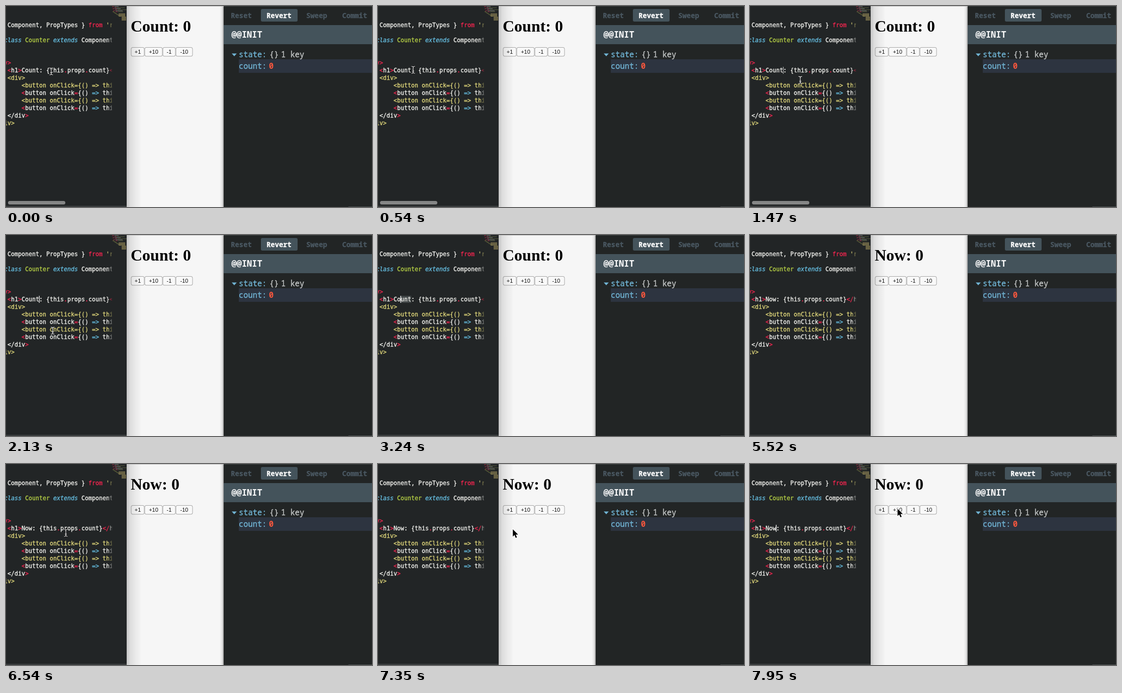
An HTML page with a canvas for the animation above (8 s loop, 728x400 px).

```html
<!DOCTYPE html>
<html>
<head>
<meta charset="utf-8">
<style>
  html, body { margin: 0; width: 728px; height: 400px; overflow: hidden; background: #222526; }
  canvas { display: block; }
</style>
</head>
<body>
<canvas id="stage" width="728" height="400"></canvas>
<script>
const ctx = document.getElementById('stage').getContext('2d');
const LOOP = 8000, CHAR = 7, LEFT = 3, BG = '#222526';
const MONO = '"DejaVu Sans Mono", monospace';
const PANEL = '"Noto Sans Mono", monospace';
const INK = { w: '#f0f0ec', r: '#f0264f', y: '#ded57a', b: '#66bfe2', g: '#b5cf45' };

const CLICK = 1080, RELOAD = 5250;
const SELECT = [2790, 2960, 3130, 3340, 3510];
const TYPE = [3750, 4020, 4140];
const KEYS = [CLICK, ...SELECT, ...TYPE];

// Mouse paths as [time, x, y]
const FIRST_PATH = [[0, 90, 130], [300, 74, 128], [540, 70, 127], [1200, 70, 127],
  [1470, 100, 147], [1800, 101, 175], [2250, 90, 196], [2790, 90, 196]];
const SECOND_PATH = [[6120, 123, 141], [6300, 122, 138], [6540, 119, 137], [6690, 119, 137], [6960, 165, 143],
  [7230, 244, 141], [7470, 292, 119], [7650, 305, 107], [7830, 297, 93], [7950, 293.5, 89], [8001, 293.5, 89]];

const countPast = (times, t) => times.filter(k => k <= t).length;
const clamp = v => Math.max(0, Math.min(1, v));

function rect(x, y, w, h, color, radius = 0) {
  ctx.fillStyle = color;
  ctx.beginPath();
  ctx.roundRect(x, y, w, h, radius);
  ctx.fill();
}

// A thin outline of the same colour gives the heavier look of screen text.
function text(str, x, y, font, color, align = 'left', weight = 0) {
  ctx.font = font;
  ctx.fillStyle = ctx.strokeStyle = color;
  ctx.textAlign = align;
  ctx.fillText(str, x, y);
  if (weight) {
    ctx.lineWidth = weight;
    ctx.strokeText(str, x, y);
  }
}

function fade(x0, x1, stops, y = 0, h = 400) {
  const g = ctx.createLinearGradient(x0, 0, x1, 0);
  stops.forEach(([at, color]) => g.addColorStop(at, color));
  rect(x0, y, x1 - x0, h, g);
}

// Each part is an ink letter followed by its text; a capital letter means italic.
function code(column, y, ...parts) {
  for (const part of parts) {
    const ink = part[0], str = part.slice(1);
    const style = ink < 'a' ? 'italic ' : '';
    text(str, LEFT + column * CHAR, y, style + '11.63px ' + MONO, INK[ink.toLowerCase()], 'left', 0.35);
    column += str.length;
  }
}

function caretAlpha(t) {
  const age = t - Math.max(...KEYS.filter(k => k <= t));
  if (age < 270) return 1;
  const p = (age - 270) % 900;
  return p < 570 ? 1 - clamp(p / 210) ** 2 : clamp((p - 570) / 210);
}

function drawMinimap() {
  for (let i = 0; i < 6; i++) {
    const x = 211 + (i * 5) % 9, y = 1 + i * 2;
    rect(x, y, 4, 1, '#a02c45');
    rect(x + 5, y, 8 + (i * 7) % 11, 1, i % 2 ? '#565b3d' : '#777a77');
  }
  for (let i = 0; i < 7; i++) rect(212 + i * 2.2, 11 + i * 1.5, 3, 1, '#70713f');
  for (let i = 0; i < 7; i++) rect(224 + (i > 2) * 6, 15 + i * 2, i > 2 ? 9 : 13, 1.5, i % 2 ? '#6f6847' : '#8c8052');
}

function drawEditor(t) {
  rect(0, 0, 240, 400, BG);
  const selected = countPast(SELECT, t), typed = countPast(TYPE, t);
  const word = typed ? 'Now'.slice(0, typed) : 'Count';
  const caretX = LEFT + CHAR * (4 + (typed || 5 - selected));
  if (selected && !typed) rect(caretX, 121, selected * CHAR, 14, '#414647');

  ctx.save();
  ctx.beginPath();
  ctx.rect(0, 0, 211, 400);
  ctx.clip();
  code(0, 42, 'wComponent, PropTypes } ', 'rfrom ', "y'react'");
  code(-1, 72, 'Bclass ', 'gCounter ', 'Bextends ', 'wComponent');
  code(-1, 117, 'rv>');
  code(0, 132, 'r<', 'wh1', 'r>', 'w' + word + ': {this', 'r.', 'wprops', 'r.', 'wcount}', 'r</', 'wh1', 'r>');
  code(0, 147, 'y<div>');
  for (const y of [162, 192]) {
    code(4, y, 'y<button onClick={() => this');
    code(4, y + 15, 'r<', 'wbutton onClick', 'r=', 'w{() ', 'B=>', 'w this');
  }
  code(0, 222, 'w</div', 'r>');
  code(-1, 237, 'yiv>');
  ctx.restore();
  fade(201, 212, [[0, '#22252600'], [1, '#222526d0']], 30, 340);

  if (t >= CLICK) {
    ctx.globalAlpha = caretAlpha(t);
    rect(caretX - 0.5, 121, 1.3, 14, '#fff');
  }
  ctx.globalAlpha = 1 - clamp((t - 1750) / 300);
  rect(4, 388, 114, 7, '#858686', 3.5);
  ctx.globalAlpha = 1;
  drawMinimap();
  rect(0, 398, 240, 1, '#535656');
}

function drawPage(t) {
  rect(240, 0, 193, 400, '#f6f6f6');
  text(t < RELOAD ? 'Count: 0' : 'Now: 0', 248, 51, 'bold 32px "Liberation Serif", serif', '#000');
  [['+1', 249, 27], ['+10', 276, 36], ['-1', 312, 26], ['-10', 338, 34]].forEach(([label, x, w]) => {
    rect(x - 0.5, 82, w, 18.5, '#a6a6a6', 4);
    rect(x + 0.5, 83, w - 2, 16.5, '#f9f9f9', 3);
    text(label, x + w / 2 - 0.5, 95, '11px "Liberation Sans", sans-serif', '#111', 'center');
  });
  // Shadows of the neighbouring windows fall over the page content.
  fade(240, 268, [[0, '#0003'], [0.25, '#0000001a'], [0.65, '#0000000c'], [1, '#00000003']]);
  fade(425, 433, [[0, '#0000'], [0.6, '#00000012'], [1, '#0000005a']]);
  rect(240, 0, 193, 1, '#b5b5b5');
}

function drawPanel() {
  rect(433, 0, 295, 400, '#222525');
  rect(433, 0, 295, 1, '#3c4041');
  rect(681, 399, 47, 1, '#4d5152');
  rect(507, 6, 73, 25, '#44535b', 3);
  rect(433, 38, 295, 38, '#44535b');
  rect(463, 106, 265, 27, '#2d3440');
  const bold = 'bold 13.8px ' + PANEL, plain = '15.4px ' + PANEL;
  const line = (str, x, y, color) => text(str, x, y, plain, color, 'left', 0.35);
  [['Reset', 468], ['Revert', 543], ['Sweep', 618], ['Commit', 693.5]].forEach(([label, x]) =>
    text(label, x, 24, bold, label === 'Revert' ? '#fff' : '#4a5862', 'center', 0.3));
  text('@@INIT', 448.5, 63, 'bold 17px ' + PANEL, '#fff');
  ctx.fillStyle = '#71b5d5';
  ctx.beginPath();
  ctx.moveTo(449, 94.5);
  ctx.lineTo(459, 94.5);
  ctx.lineTo(454, 100);
  ctx.fill();
  line('state:', 463, 102, '#71b5d5');
  line('{}', 524, 102, '#c3c6c6');
  line('1 key', 547, 102, '#c3c6c6');
  line('count:', 463, 124.5, '#71b5d5');
  text('0', 523, 124.5, 'bold 15.4px ' + PANEL, '#f9573d');
}

function pathPoint(path, t) {
  const i = path.findIndex(p => p[0] > t);
  if (i < 1) return null;
  const [t0, x0, y0] = path[i - 1], [t1, x1, y1] = path[i];
  const k = (t - t0) / (t1 - t0);
  return [x0 + (x1 - x0) * k, y0 + (y1 - y0) * k];
}

function drawMouse(t) {
  const point = pathPoint(FIRST_PATH, t) || pathPoint(SECOND_PATH, t);
  if (!point) return;
  ctx.save();
  ctx.translate(...point);
  if (point[0] < 212) {
    const beam = new Path2D('M-3.5-7Q0-7 0-4.5Q0-7 3.5-7M0-5V5M-3.5 7Q0 7 0 4.5Q0 7 3.5 7M-2 2.5H2');
    ctx.strokeStyle = '#111';
    ctx.lineWidth = 2.6;
    ctx.stroke(beam);
    ctx.strokeStyle = '#eee';
    ctx.lineWidth = 1.2;
    ctx.stroke(beam);
  } else {
    const arrow = new Path2D('M0 0V14.5L3.3 11.4L5.7 17L8.2 16L5.8 10.5H10.5Z');
    ctx.strokeStyle = '#fff';
    ctx.lineWidth = 2;
    ctx.stroke(arrow);
    ctx.fillStyle = '#000';
    ctx.fill(arrow);
  }
  ctx.restore();
}

function frame() {
  const t = performance.now() % LOOP;
  drawEditor(t);
  drawPage(t);
  drawPanel();
  drawMouse(t);
  requestAnimationFrame(frame);
}
frame();
</script>
</body>
</html>
```
